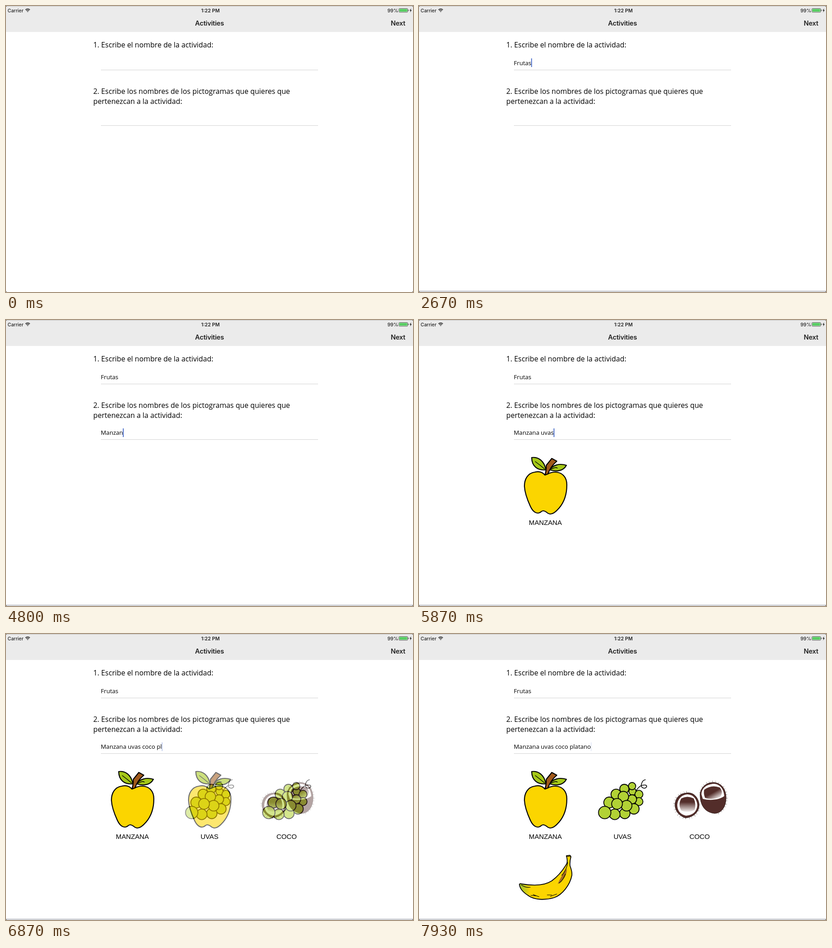
Write an HTML page that moves like this. It is 892 by 628 pixels and loops after 8 s.

```html
<!DOCTYPE html>
<html lang="es">
<head>
<meta charset="utf-8">
<title>Activities</title>
<style>
html, body { margin: 0; width: 100%; height: 100%; overflow: hidden; background: #fff; }
svg { display: block; width: 892px; height: 628px; }
text { white-space: pre; }
.bar { font: 500 10.45px Inter, sans-serif; fill: #222; }
.bar .clock { font-weight: 600; font-size: 10.7px; }
.title { font: 600 14.5px Inter, sans-serif; letter-spacing: -.2px; fill: #222; }
.ask { font: 15.78px "Open Sans", sans-serif; fill: #000; }
.field { font: 13.1px "Open Sans", sans-serif; fill: #000; }
.label { font: 14.8px "Liberation Sans", Arial, sans-serif; fill: #000; text-anchor: middle; }
.ink { stroke: #000; stroke-linejoin: round; stroke-linecap: round; }
.cell { isolation: isolate; }
.cell use { mix-blend-mode: plus-lighter; }
</style>
</head>
<body>
<svg viewBox="0 0 892 628" xmlns="http://www.w3.org/2000/svg">
  <defs>
    <linearGradient id="flesh" x1="0" y1="0" x2="0" y2="1">
      <stop offset=".35" stop-color="#532d2a"/><stop offset="1" stop-color="#f4efee"/>
    </linearGradient>
    <linearGradient id="flesh2" x1=".2" y1="0" x2="1" y2="1">
      <stop offset=".45" stop-color="#532d2a"/><stop offset=".9" stop-color="#f4efee"/>
    </linearGradient>
    <linearGradient id="peel" x1="219" x2="244" y1="0" y2="0" gradientUnits="userSpaceOnUse">
      <stop offset=".2" stop-color="#a5c52c"/><stop offset="1" stop-color="#fbd500"/>
    </linearGradient>

    <!-- Pictograms, drawn in the first column -->
    <g id="pic0" class="ink" stroke-width="2.2">
      <path fill="#fbd500" d="M276 340.5C270 333 262 332 254 334C238 336 231 350 231 365C232 381 238 396 244 409C249 420 254 424 261 424C267 424 267 419 272 419C279 419 281 426 288 426C294 426 301 420 307 413C319 399 324 380 324 362C324 344 313 334 298 334C289 334 284 337 276 340.5Z"/>
      <path fill="#a5c817" d="M247 302C262 300 275 310 278 329C260 331 247 321 247 302ZM286 329C293 319 307 314 323 319C317 331 303 334 286 329Z"/>
      <path fill="none" stroke-width="1.5" d="M255 311Q266 319 275 327M288 328Q300 322 303 325"/>
      <path fill="#a0591b" d="M291 304L302 310Q287 323 283 338L276 340Q279 331 279 319Z"/>
    </g>
    <g id="pic1" class="ink" stroke-width="1.8" fill="#b2d235"></g>
    <g id="pic2" transform="translate(-338 0)">
      <path fill="none" stroke="#6b5a58" stroke-width="5" stroke-dasharray=".7 5 .5 7" d="M587 347C568 350 559 362 560 378C562 395 572 404 588 405C605 402 613 393 614 375M616 349C621 330 635 322 651 325C668 331 674 344 674 361C674 379 665 390 652 395"/>
      <path fill="#532d2a" stroke="#2b1715" d="M587 349C602 347 612 359 614 374C614 391 602 402 584 404C570 399 561 389 561 374C563 358 572 350 587 349Z"/>
      <path fill="#fff" d="M588 352C602 353 609 363 610 376C609 390 600 398 585 399C572 396 566 387 566 375C567 362 576 353 588 352Z"/>
      <path fill="url(#flesh)" d="M575 361Q588 354 602 361Q608 373 604 386Q590 394 575 388Q567 374 575 361Z"/>
      <path fill="#532d2a" stroke="#2b1715" d="M616 352C617 337 630 325 647 326C663 328 672 340 673 358C673 379 664 393 648 394C628 392 616 378 616 352Z"/>
      <path fill="#fff" d="M619 352C619 338 632 329 647 329C660 330 668 341 669 356C660 363 640 367 622 362Z"/>
      <path fill="url(#flesh2)" d="M625 342Q641 330 659 337Q668 347 660 358Q643 365 627 360Q623 350 625 342Z"/>
    </g>
    <g id="pic3">
      <path class="ink" stroke-width="1.8" fill="url(#peel)" d="M220 550Q221 547 226 549C251 553 276 552 291 542C306 531 316 518 324 504Q326 496 323 487L331 486L333 489Q330 500 331 509C334 517 336 523 335 530C331 551 314 573 296 579C276 585 252 584 239 574C228 567 221 559 220 550Z"/>
      <path fill="#a66c24" d="M324 515Q325 534 304 549Q310 534 324 515Z"/>
      <path class="ink" fill="none" stroke-width="1.2" d="M326 501Q324 517 313 530M321 527Q316 541 307 547M224 551Q235 558 244 556M245 574L258 575M250 572L263 577M281 573L291 573M288 576L302 571M323 488L332 489"/>
    </g>
  </defs>

  <rect width="892" height="628" fill="#fff"/>
  <rect width="892" height="57" fill="#ebebeb"/>
  <rect width="892" height="1" fill="#c6c6c6"/>
  <g class="bar">
    <text x="3.5" y="13.6">Carrier</text>
    <text class="clock" x="448" y="13.6" text-anchor="middle">1:22 PM</text>
    <text x="836" y="13.6">99%</text>
  </g>
  <g fill="none" stroke="#222" stroke-width="1.5">
    <path d="M42.6 8.3Q47.5 4.2 52.4 8.3M44.5 10.3Q47.5 7.8 50.5 10.3"/>
    <path d="M47.5 13.4L45.9 11.8Q47.5 10.6 49.1 11.8Z" fill="#222" stroke="none"/>
  </g>
  <rect x="860.9" y="5.5" width="19.6" height="8.2" rx="1.6" fill="#f5f5f5" stroke="#333" stroke-width=".8"/>
  <rect x="862" y="6.6" width="17.4" height="6" rx=".8" fill="#57cd62"/>
  <path d="M881.3 8v3.2q1.2-.4 1.2-1.6t-1.2-1.6Z" fill="#333"/>
  <path d="M888 5.2L884.4 10.1H886.5L885.5 14L889.3 8.9H887Z" fill="#222"/>
  <g class="title">
    <text x="446" y="43" text-anchor="middle">Activities</text>
    <text x="875.3" y="43" text-anchor="end">Next</text>
  </g>
  <g class="ask">
    <text x="191.3" y="91">1. Escribe el nombre de la actividad:</text>
    <text x="191.3" y="193">2. Escribe los nombres de los pictogramas que quieres que</text>
    <text x="191.3" y="214.5">pertenezcan a la actividad:</text>
  </g>
  <path d="M208 140.5H684M208 262.5H684" stroke="#d2d2d2"/>
  <text class="field" id="name" x="207.8" y="129.5"></text>
  <text class="field" id="list" x="207.8" y="252.4"></text>
  <rect id="caret" width="1.8" height="19" fill="#4267c8"/>
  <g id="cells"></g>
  <rect id="keys" width="892" height="4" fill="#d0d2d7"/>
  <path d="M0 0H2L0 2ZM892 0H890L892 2ZM0 628H2L0 626ZM892 628H890L892 626Z" fill="#555"/>
</svg>
<script>
const LOOP = 8000, COL = 169, DELAY = 80, FADE = 300;
const NS = "http://www.w3.org/2000/svg";
const $ = id => document.getElementById(id);
const clamp = v => Math.max(0, Math.min(1, v));
const ramp = (t, a, b) => clamp((t - a) / (b - a));

function add(parent, tag, attrs) {
  const el = document.createElementNS(NS, tag);
  for (const k in attrs) el.setAttribute(k, attrs[k]);
  return parent.appendChild(el);
}

// Grapes, back to front: x, y, radius
const grapes = [
  [299, 346, 8], [298, 334, 8], [281, 340, 10], [313, 352, 8.8], [263, 352, 11.3],
  [313, 368, 8.8], [298, 363, 10], [279, 357, 11.5], [248, 370, 12], [302, 384, 11.5],
  [282, 394, 11.5], [286, 377, 11.7], [260, 396, 11.6], [238, 392, 13.6], [265, 373, 11.8]
];
add($("pic1"), "path", {
  d: "M307 344Q314 333 321 332Q330 330 330 335Q328 340 322 338Q316 335 319 328Q321 321 327 320",
  fill: "none", "stroke-width": 1.6
});
for (const [cx, cy, r] of grapes) add($("pic1"), "circle", { cx, cy, r });

const typing = {
  name: ["Frutas", [2000, 2130, 2270, 2400, 2530, 2670]],
  list: ["Manzana uvas coco platano", [
    3870, 3970, 4050, 4530, 4650, 4770, 4850, 5470, 5570, 5670, 5760, 5850, 5950,
    6060, 6130, 6200, 6270, 6400, 6650, 6790, 6920, 7020, 7110, 7210, 7380]]
};

// Each reload: time, number of found words, single letter shown after them
const words = ["MANZANA", "UVAS", "COCO"];
const reloads = [
  [0, 0], [3890, 0, "M"], [3990, 0], [4850, 1], [5580, 1, "U"], [5690, 1],
  [5960, 2], [6080, 2, "C"], [6160, 2], [6300, 3], [6660, 3], [7130, 3], [7230, 3], [7390, 4]
];

const cells = [0, 1, 2, 3].map(i => {
  const x = i < 3 ? COL * i : 0;
  const g = add($("cells"), "g", { class: "cell", transform: `translate(${x} 0)` });
  const old = i > 0 && i < 3 ? add(g, "use", { href: "#pic" + (i - 1) }) : null;
  const pic = add(g, "use", { href: "#pic" + i });
  const label = add(g, "text", { class: "label", x: 277, y: 449.7 });
  return { old, pic, label };
});

function drawCells(t) {
  let n = reloads.length - 1;
  while (reloads[n][0] > t) n--;
  const [start, count, letter] = reloads[n];
  const before = n ? reloads[n - 1][1] : 0;
  const mix = clamp((t - start - DELAY) / FADE);
  cells.forEach(({ old, pic, label }, i) => {
    const shown = i < count, kept = i < before;
    pic.setAttribute("opacity", !shown ? 0 : i === 0 && kept ? 1 : mix);
    // A reused cell still holds its neighbour's picture
    if (old) old.setAttribute("opacity", shown && kept ? 1 - mix : 0);
    label.textContent = shown ? words[i] || "" : i === count && letter || "";
  });
}

function typed(id, t) {
  const [text, times] = typing[id];
  const value = text.slice(0, times.filter(at => at <= t).length);
  $(id).textContent = value;
  return value ? $(id).getComputedTextLength() : 0;
}

function caretAlpha(t) {
  if (t < 2700) return ramp(t, 930, 1060) - ramp(t, 1450, 1600) + ramp(t, 1850, 2000);
  if (t < 6250) return ramp(t, 2700, 2850) - ramp(t, 3380, 3530) + ramp(t, 3780, 3900);
  return t < 7400 ? 1 - .65 * ramp(t, 6250, 6450) : .35 - .2 * ramp(t, 7600, 7900);
}

function draw(t) {
  const nameWidth = typed("name", t), listWidth = typed("list", t);
  const first = t < 2700;
  $("caret").setAttribute("x", 208 + (first ? nameWidth : listWidth) - (t > 2000 ? .5 : 0));
  $("caret").setAttribute("y", first ? 115 : 238);
  $("caret").setAttribute("opacity", caretAlpha(t));
  $("keys").setAttribute("y", 628 - 3.2 * ramp(t, 930, 1230));
  drawCells(t);
}

const begin = performance.now();
function frame() {
  draw((performance.now() - begin) % LOOP);
  requestAnimationFrame(frame);
}
frame();
</script>
</body>
</html>
```
